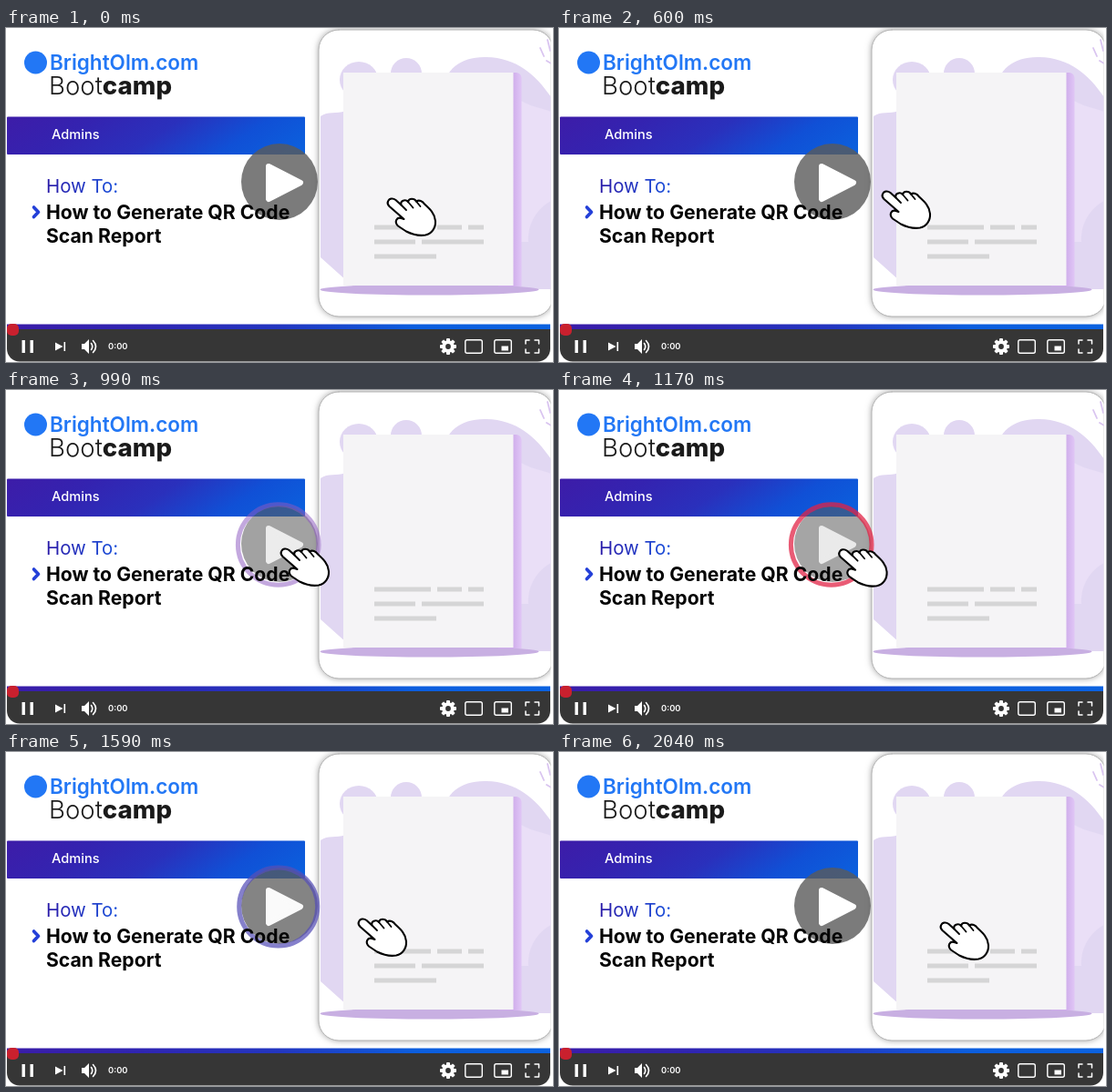
Write an HTML page with a canvas that moves like this. It is 600 px wide and 367 px high and loops after 2.81 s.

```html
<!DOCTYPE html>
<html lang="en">
<head>
<meta charset="utf-8">
<title>How to Generate QR Code Scan Report</title>
<style>
html, body { margin: 0; width: 100%; height: 100%; overflow: hidden; background: #fff; }
canvas { display: block; width: 600px; height: 367px; }
</style>
</head>
<body>
<canvas id="stage"></canvas>
<script>
const W = 600, H = 367, LOOP = 2810, STEP = 30;
const canvas = document.getElementById('stage');
const dpr = window.devicePixelRatio || 1;
canvas.width = W * dpr;
canvas.height = H * dpr;
const c = canvas.getContext('2d');
c.scale(dpr, dpr);

// Keyframes: time, then values
const HAND = [
  [240, 418, 187], [780, 322, 175], [900, 301, 174], [1140, 301, 174],
  [1350, 340, 179], [1590, 386, 183], [1760, 418, 187]
];
// time, red, green, blue, ring alpha, radius, disc alpha
const RING = [
  [810, 120, 100, 200, 0, 43, 0.8], [990, 140, 88, 192, 0.52, 44.3, 0.56],
  [1200, 240, 25, 50, 0.78, 44.3, 0.54], [1380, 240, 25, 50, 0.78, 44.3, 0.54],
  [1590, 86, 80, 184, 0.72, 43, 0.74], [2040, 86, 80, 184, 0, 42, 0.8]
];

function at(keys, t) {
  if (t <= keys[0][0]) return keys[0].slice(1);
  for (let i = 1; i < keys.length; i++) {
    const a = keys[i - 1], b = keys[i];
    if (t <= b[0]) {
      const k = (t - a[0]) / (b[0] - a[0]);
      return a.slice(1).map((v, j) => v + (b[j + 1] - v) * k);
    }
  }
  return keys[keys.length - 1].slice(1);
}

function rect(x, y, w, h, fill, r = 0) {
  c.beginPath();
  c.roundRect(x, y, w, h, r);
  c.fillStyle = fill;
  c.fill();
}

function oval(x, y, rx, ry, fill) {
  c.beginPath();
  c.ellipse(x, y, rx, ry, 0, 0, Math.PI * 2);
  c.fillStyle = fill;
  c.fill();
}

function line(d, color, width) {
  c.strokeStyle = color;
  c.lineWidth = width;
  c.stroke(new Path2D(d));
}

function shape(d, fill) {
  c.fillStyle = fill;
  c.fill(new Path2D(d));
}

function text(s, x, y, size, weight, fill) {
  c.font = `${weight} ${size}px Inter, "Open Sans", sans-serif`;
  c.fillStyle = fill;
  c.fillText(s, x, y);
  return c.measureText(s).width;
}

function blend(x0, y0, x1, y1, ...colors) {
  const g = c.createLinearGradient(x0, y0, x1, y1);
  colors.forEach((col, i) => g.addColorStop(i / (colors.length - 1), col));
  return g;
}

function heading() {
  oval(32.5, 38, 12.5, 12.5, '#2277f5');
  text('BrightOlm.com', 48, 46, 22.5, 600, '#2277f5');
  const w = text('Boot', 47, 73, 27.6, 300, '#1a1a1a');
  text('camp', 47 + w, 73, 27.6, 800, '#1a1a1a');
  const fill = blend(1, 97, 123, 278, '#3d1ca8', '#3423b0', '#2a30bc', '#1050d6', '#0b62de');
  rect(1, 97.5, 327, 41.5, fill, 1);
  text('Admins', 50, 122, 14.6, 500, '#fff');
}

function title() {
  text('How To:', 44, 181, 20.4, 400, blend(44, 0, 124, 0, '#2a1aa8', '#1b52dc'));
  line('M30.5 197 L35.5 202.3 L30.5 207.6', '#2440d8', 3.6);
  text('How to Generate QR Code', 44, 209.5, 21.2, 700, '#050505');
  text('Scan Report', 44, 235.5, 21.2, 700, '#050505');
}

function card() {
  c.save();
  c.beginPath();
  c.rect(0, 0, 597.5, 325);
  c.clip();
  c.save();
  c.shadowColor = 'rgba(0,0,0,.4)';
  c.shadowBlur = 7 * dpr;
  rect(343, 2, 257, 315, '#fff', 22);
  c.restore();
  c.beginPath();
  c.roundRect(343, 2, 257, 315, 22);
  c.strokeStyle = '#b4b4b4';
  c.lineWidth = 1;
  c.stroke();

  c.clip();
  const lilac = '#e1d7f2';
  oval(387, 57, 21, 20, lilac);
  oval(439, 50, 17, 17, lilac);
  shape('M345 97 C353 91 363 95 372 91 L480 70 C480 45 500 31 527 32 ' +
    'C560 33 580 50 598 76 L598 287 L384 287 L345 252 Z', lilac);
  shape('M565 80 C575 86 587 88 598 92 L598 190 C583 198 572 214 573 235 L565 235 Z', '#eadff7');
  line('M586 22 L590 31 M594 13 L597 25 M593 36 L598 39', '#d9c4f0', 1.8);

  oval(464.5, 287.5, 120, 6, '#c8afe2');
  rect(540, 49, 25.5, 235, blend(556, 0, 565, 0, '#cfadeb', '#dfc5f5'), [0, 6, 0, 0]);
  rect(370, 49, 186.5, 234, '#f5f4f6');
  const bars = [[404, 217, 62], [473, 217, 27], [507, 217, 17],
    [404, 233, 45], [456, 233, 68], [404, 249, 68]];
  for (const [x, y, w] of bars) rect(x, y - 0.5, w, 5, '#d5d5d6');
  c.restore();
}

function gear(x, y) {
  c.save();
  c.translate(x, y);
  for (let i = 0; i < 8; i++) {
    rect(-2, -9, 4, 5, '#fff', 1);
    c.rotate(Math.PI / 4);
  }
  oval(0, 0, 6.8, 6.8, '#fff');
  oval(0, 0, 2.9, 2.9, '#333');
  c.restore();
}

function controls() {
  rect(1, 331, 596, 35.5, '#363636', [0, 0, 14, 14]);
  rect(1, 325.5, 596, 5.5, blend(1, 0, 597, 0, '#3a1ca8', '#2f25b2', '#2336c0', '#0c5ede', '#0b62e0'));
  rect(1, 325, 13, 13, '#c9202e', 5);

  rect(17.5, 343, 3.4, 14, '#fff');
  rect(26.5, 343, 3.4, 14, '#fff');
  shape('M54 345.5 L62.5 350 L54 354.5 Z', '#fff');
  rect(63.5, 345, 1.6, 10, '#fff');
  shape('M83 347 H86 L91 342 V358 L86 353 H83 Z', '#fff');
  line('M93.5 346.5 Q96 350 93.5 353.5 M95.5 343.5 Q101.5 350 95.5 356.5', '#fff', 1.6);
  text('0:00', 112, 353, 9.4, 600, '#fff');

  gear(485, 350);
  c.beginPath();
  c.roundRect(503.8, 342.8, 18.5, 14.5, 2);
  c.roundRect(535.8, 342.8, 18.5, 14.5, 2);
  c.strokeStyle = '#fff';
  c.lineWidth = 1.4;
  c.stroke();
  rect(543.5, 349.5, 7.5, 5, '#fff');
  line('M570 347 V343 H574 M580 343 H584.5 V347 M584.5 353 V357 H580 M574 357 H570 V353', '#fff', 1.5);
}

function button(t) {
  const [r, g, b, alpha, radius, disc] = at(RING, t);
  oval(300, 169, 42, 42, `rgba(90,90,90,${disc})`);
  if (alpha > 0) {
    c.beginPath();
    c.arc(298.7, 170, radius, 0, Math.PI * 2);
    c.strokeStyle = `rgba(${r},${g},${b},${alpha})`;
    c.lineWidth = 5;
    c.stroke();
  }
  const tri = 'M288 152 L323 170 L288 188 Z';
  const light = 255 - (0.8 - disc) * 80;
  const fill = `rgb(${light},${light},${light})`;
  shape(tri, fill);
  line(tri, fill, 6);
}

const PALM = 'M1 3.5 C2.5 -0.5 7 0 9.5 2 L15.5 7.5 C14 3 20 0.5 23 4 ' +
  'C24 -0.5 30 0 32 3.5 C35 1.5 39 3 41 6.5 C47 12 52.5 17 53 25 ' +
  'C53.5 33 49 39 42 40.5 C33 42 27 39.5 21 36.5 L12 30.5 ' +
  'C7.5 26 10.5 20.5 15.5 22 L18.5 23 L2.5 9 C0.5 7 0 5.5 1 3.5 Z';

function hand(t) {
  const [x, y] = at(HAND, t);
  c.save();
  c.translate(x, y);
  shape(PALM, '#fff');
  line(PALM, '#000', 2.1);
  line('M15.5 7.5 L21 13 M23 4 L28.5 10.5 M32 3.5 L36.5 9', '#000', 1.8);
  c.restore();
}

function draw(now) {
  const t = Math.floor((now % LOOP) / STEP) * STEP;
  c.lineJoin = c.lineCap = 'round';
  c.fillStyle = '#fff';
  c.fillRect(0, 0, W, H);
  heading();
  card();
  controls();
  button(t);
  title();
  hand(t);
}

let start = null;
function tick(now) {
  if (start === null) start = now;
  draw(now - start);
  requestAnimationFrame(tick);
}
draw(0);
requestAnimationFrame(tick);
</script>
</body>
</html>
```
